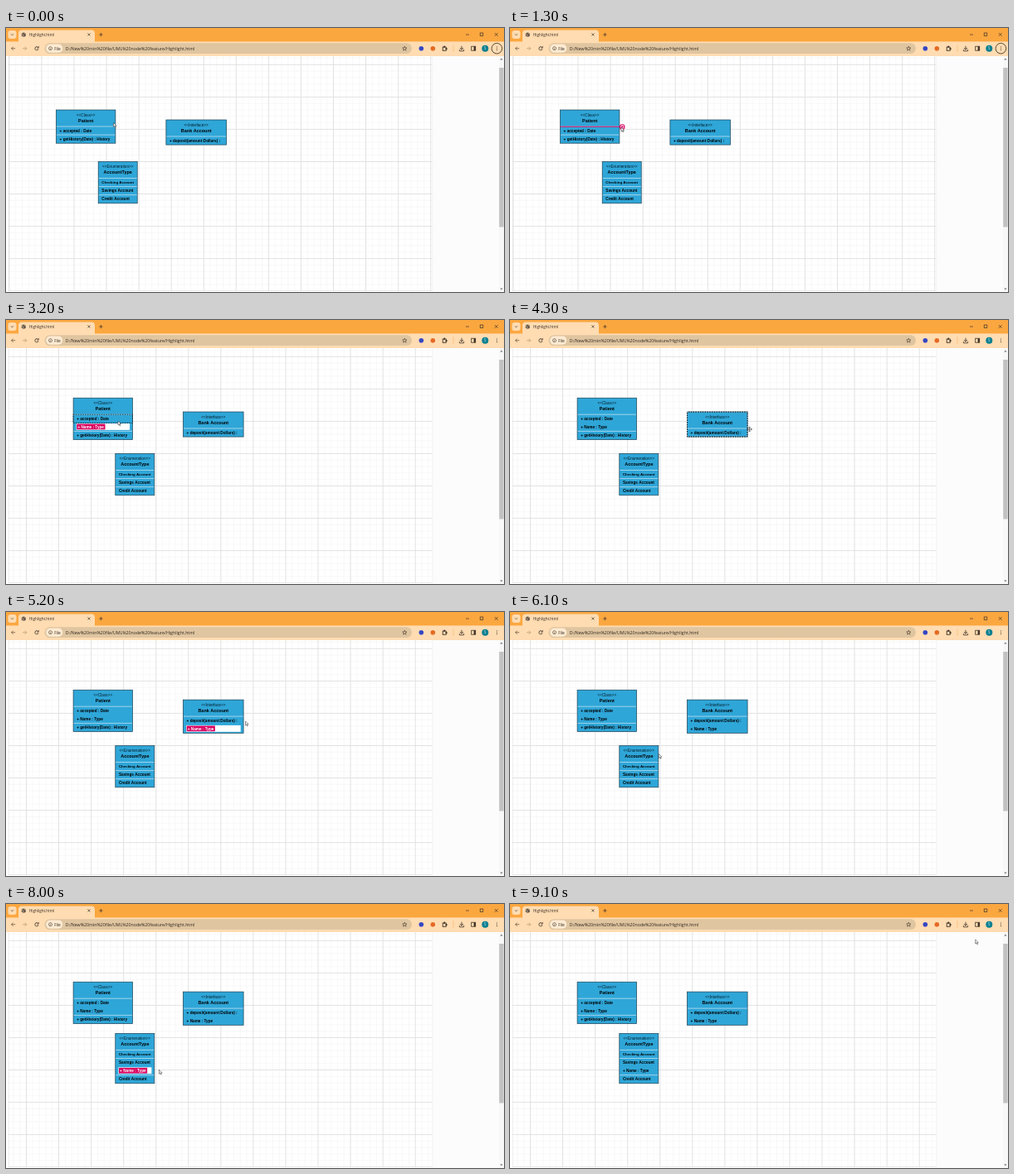
An HTML page with a canvas that plays this animation: 600 px wide and 319 px high, repeating every 9200 ms.

```html
<!DOCTYPE html>
<html lang="en">
<head>
<meta charset="utf-8">
<title>UML row insertion</title>
<style>
html, body { margin: 0; width: 100%; height: 100%; overflow: hidden; background: #fff; }
canvas { display: block; width: 600px; height: 319px; }
</style>
</head>
<body>
<canvas id="stage"></canvas>
<script>
const W = 600, H = 319, LOOP = 9200;
const UI = '"Open Sans", sans-serif', ARIAL = '"Liberation Sans", Arial, sans-serif';
const BLUE = '#2fa6d8', PINK = '#d8005f', INK = '#3d3226';
const STRIP = '#fba740', BAR = '#ffdcb2', FIELD = '#dfc5a0', CHIP = '#fdead2';
const canvas = document.getElementById('stage');
const ctx = canvas.getContext('2d');
const dpr = window.devicePixelRatio || 1;
canvas.width = W * dpr;
canvas.height = H * dpr;

// time, x, y of the pointer tip
const path = [
  [0, 129.5, 114.5], [400, 129.5, 114.5], [500, 131, 117], [1000, 131, 117],
  [1100, 133, 119], [1200, 133, 119], [1300, 134, 120], [1400, 134, 120],
  [1700, 136, 121], [2000, 136, 121], [2300, 135, 122], [3600, 135, 122],
  [4000, 270, 128], [4200, 270, 128], [4300, 288.5, 132], [5800, 288.5, 132],
  [5900, 260, 145], [6100, 179.3, 171.5], [6300, 179.3, 171.5], [6600, 181, 180],
  [6700, 181, 180], [7100, 184, 192], [7200, 184, 192], [7800, 184.5, 200.3],
  [8600, 184.5, 200.3], [8700, 300, 150], [8900, 300, 150], [9000, 500, 70], [9100, 560.7, 43]
];

function pointerAt(t) {
  const i = path.findIndex(k => k[0] >= t);
  if (i < 0) return path[path.length - 1].slice(1);
  if (i === 0) return path[0].slice(1);
  const a = path[i - 1], b = path[i], p = (t - a[0]) / (b[0] - a[0]);
  return [a[1] + (b[1] - a[1]) * p, a[2] + (b[2] - a[2]) * p];
}

function rect(x, y, w, h, fill) {
  ctx.fillStyle = fill;
  ctx.fillRect(x, y, w, h);
}

function pill(x, y, w, h, r, fill) {
  ctx.beginPath();
  ctx.roundRect(x, y, w, h, r);
  ctx.fillStyle = fill;
  ctx.fill();
}

function dot(x, y, r, fill) {
  ctx.beginPath();
  ctx.arc(x, y, r, 0, 7);
  ctx.fillStyle = fill;
  ctx.fill();
}

function ring(x, y, r, color, width) {
  ctx.beginPath();
  ctx.arc(x, y, r, 0, 7);
  ctx.strokeStyle = color;
  ctx.lineWidth = width;
  ctx.stroke();
}

function line(points, color = INK, width = 0.7) {
  ctx.beginPath();
  for (let i = 0; i < points.length; i += 2) ctx.lineTo(points[i], points[i + 1]);
  ctx.strokeStyle = color;
  ctx.lineWidth = width;
  ctx.stroke();
}

function frame(x, y, w, h, color = INK, width = 0.7) {
  ctx.strokeStyle = color;
  ctx.lineWidth = width;
  ctx.strokeRect(x, y, w, h);
}

function text(str, x, y, font, color, align = 'left') {
  ctx.font = font;
  ctx.fillStyle = color;
  ctx.textAlign = align;
  ctx.textBaseline = 'alphabetic';
  ctx.fillText(str, x, y);
}

function drawTabs() {
  rect(0, 0, W, 18, STRIP);
  pill(2.5, 3, 10, 10, 3, BAR);
  line([6, 7.3, 7.5, 8.8, 9, 7.3]);
  pill(15, 2.5, 92, 17, 4, BAR);
  dot(21.3, 8, 2.6, '#5c5146');
  line([19.2, 7.2, 21, 8.2, 20.6, 10], BAR, 0.6);
  line([21.8, 6, 23, 7.6], BAR, 0.6);
  text('Highlight.html', 28, 9.7, `4.57px ${UI}`, '#332a20');
  line([98.4, 6.4, 101.4, 9.4]);
  line([101.4, 6.4, 98.4, 9.4]);
  line([112.2, 8, 116.6, 8]);
  line([114.4, 5.8, 114.4, 10.2]);
  line([554, 8, 558, 8]);
  frame(571.2, 6, 3.6, 3.6);
  line([588.8, 6, 592.6, 9.8]);
  line([592.6, 6, 588.8, 9.8]);
}

function drawToolbar(menuFocus) {
  rect(0, 16.4, W, 17.6, BAR);
  line([11.2, 24.7, 6.6, 24.7], '#5b4933');
  line([8.7, 22.6, 6.6, 24.7, 8.7, 26.8], '#5b4933');
  line([20.2, 24.7, 24.8, 24.7], '#b39870');
  line([22.7, 22.6, 24.8, 24.7, 22.7, 26.8], '#b39870');
  ctx.beginPath();
  ctx.arc(37, 24.7, 2.1, 0.2, 5.5);
  ctx.strokeStyle = INK;
  ctx.lineWidth = 0.8;
  ctx.stroke();
  line([39.2, 22, 39.2, 24, 37.2, 24], INK, 0.8);

  pill(46.5, 18.3, 442.5, 12.8, 6.4, FIELD);
  pill(48.3, 19.6, 20, 10.2, 5, CHIP);
  ring(53.5, 24.7, 2, INK, 0.6);
  line([53.5, 24.5, 53.5, 25.8], INK, 0.6);
  text('File', 58.2, 26.5, `4.8px ${UI}`, '#332a20');
  text('D:/New%20min%20file/UML%20node%20feature/Highlight.html', 71.7, 26.6, `5.24px ${UI}`, '#332a20');

  const star = [];
  for (let i = 0; i <= 10; i++) {
    const r = i % 2 ? 1.2 : 2.8, a = i * Math.PI / 5 - Math.PI / 2;
    star.push(480.3 + r * Math.cos(a), 24.9 + r * Math.sin(a));
  }
  line(star, INK, 0.6);

  dot(500.3, 24.8, 2.8, '#3547c5');
  dot(514.3, 24.8, 2.8, '#e46a24');
  frame(526.2, 23.1, 4, 4.2, INK, 0.9);
  dot(528.2, 22.6, 1.1, INK);
  dot(530.6, 25.2, 1.1, INK);
  line([539, 20.5, 539, 29], '#f8b968', 0.6);
  line([549, 21.8, 549, 26], INK, 0.9);
  line([547, 24.2, 549, 26.2, 551, 24.2], INK, 0.9);
  line([546.4, 26, 546.4, 27.8, 551.6, 27.8, 551.6, 26], INK, 0.8);
  frame(560.7, 22.2, 5, 5, INK, 0.8);
  rect(563.6, 22.2, 2.2, 5, INK);
  dot(577.3, 24.7, 4, '#087f91');
  text('S', 577.3, 26.3, `4.4px ${UI}`, '#e3f5f5', 'center');
  if (menuFocus) ring(591.4, 24.7, 6.3, '#46392a', 0.9);
  for (let i = -1; i < 2; i++) dot(591.4, 24.7 + i * 1.9, 0.55, INK);
}

function drawPage(shift) {
  rect(0, 34, W, H - 34, '#fff');
  rect(513.5, 34, 80.5, H - 34, '#fcfcfc');
  ctx.save();
  ctx.beginPath();
  ctx.rect(3, 34, 510.5, 284);
  ctx.clip();
  const major = 39.06, minor = major / 5, x0 = 3.9 + shift - major, y0 = 44.3 - major;
  for (const isMajor of [false, true]) {
    const color = isMajor ? '#dfdfdf' : '#f3f3f3', width = isMajor ? 0.9 : 0.6;
    for (let i = 0; i < 75; i++) {
      if ((i % 5 === 0) !== isMajor) continue;
      const x = x0 + i * minor, y = y0 + i * minor;
      line([x, 34, x, 318], color, width);
      line([3, y, 514, y], color, width);
    }
  }
  ctx.restore();
  line([3.2, 34, 3.2, 318], '#dedede', 0.6);
  line([513.6, 34, 513.6, 318], '#ececec', 0.5);
  rect(594, 34, 6, H - 34, '#f8f8f8');
  rect(594.2, 48, 5.4, 192.5, '#c2c2c2');
  for (const [y, d] of [[37.5, -1], [315.5, 1]]) {
    ctx.beginPath();
    ctx.moveTo(595.2, y - d);
    ctx.lineTo(598.6, y - d);
    ctx.lineTo(596.9, y + d);
    ctx.fillStyle = '#777';
    ctx.fill();
  }
}

// rows: [label, separator above?, font size]
function drawNode(x, y, w, kind, title, rows, opt = {}) {
  const h = 20 + rows.length * 10.1, cx = x + w / 2;
  rect(x, y, w, h, BLUE);
  text(`<<${kind}>>`, cx, y + 7.6, `4.69px ${ARIAL}`, '#071e29', 'center');
  text(title, cx, y + 14.6, `bold 5.47px ${ARIAL}`, '#000', 'center');
  rows.forEach(([label, sep, size = 4.69], i) => {
    const top = y + 20 + i * 10.1;
    if (sep) line([x, top, x + w, top], '#cfe9f5', 0.7);
    const font = `bold ${size}px ${ARIAL}`;
    if (opt.edit === i) {
      rect(x + 3.6, top + 0.7, w - 7, 7.9, '#fff');
      ctx.font = font;
      rect(x + 4.2, top + 1.3, ctx.measureText(label).width + 2.6, 6.7, PINK);
      text(label, x + 5.3, top + 6.4, font, '#fff');
    } else {
      text(label, x + 4.1, top + 6.6, font, '#000');
    }
  });
  frame(x, y, w, h, '#173e50', 0.7);
  if (opt.dashed) {
    ctx.setLineDash([1.6, 1.2]);
    if (opt.dashed === 'row') frame(x, y + 20, w, 10.1, '#0b2330', 0.9);
    else {
      frame(x, y, w, h, '#c9e6f2', 0.8);
      ctx.lineDashOffset = 1.4;
      frame(x, y, w, h, '#000', 0.8);
      ctx.lineDashOffset = 0;
    }
    ctx.setLineDash([]);
  }
}

function drawInsert(x, w, y) {
  const cx = x + w + 3.3;
  line([x, y, cx - 2.5, y], PINK, 1);
  dot(cx, y + 0.3, 3.2, '#fff');
  ring(cx, y + 0.3, 2.7, PINK, 1.1);
  line([cx - 1.6, y + 0.3, cx + 1.6, y + 0.3], PINK, 0.9);
  line([cx, y - 1.3, cx, y + 1.9], PINK, 0.9);
}

function drawDiagram(t) {
  const within = (a, b) => t >= a && t < b;
  const shift = t >= 3200 ? 20.6 : 0;
  const added = ['+ Name : Type', false];
  drawPage(shift);

  const patient = [['+ accepted : Date', true], ['+ getHistory(Date) : History', true]];
  if (t >= 3200) patient.splice(1, 0, added);
  const editing = within(3200, 3700);
  drawNode(60.5 + shift, t >= 3200 ? 94.2 : 99, 71.4, 'Class', 'Patient', patient,
    { edit: editing ? 1 : -1, dashed: editing ? 'row' : '' });

  const bank = [['+ deposit(amount:Dollars) :', true]];
  if (t >= 5200) bank.push(added);
  drawNode(192.9 + shift, t >= 5200 ? 106.1 : 111, 72.6, 'Interface', 'Bank Account', bank,
    { edit: within(5200, 5900) ? 1 : -1, dashed: within(4300, 4600) ? 'box' : '' });

  const account = [['Checking Account', true, 4.4], ['Savings Account', true], ['Credit Account', true]];
  if (t >= 8000) account.splice(2, 0, added);
  drawNode(111.2 + shift, t >= 8000 ? 156.4 : 161.5, 47, 'Enumeration', 'AccountType', account,
    { edit: within(8000, 8400) ? 2 : -1 });

  if (within(1100, 3200)) drawInsert(60.5, 71.4, 119.2);
  if (within(4600, 5200)) drawInsert(213.5, 72.6, 131.2);
  if (within(6900, 7300)) drawInsert(131.8, 47, 191.5);
  if (within(7300, 8000)) drawInsert(131.8, 47, 201.6);
}

function drawArrow(x, y) {
  ctx.beginPath();
  for (const [dx, dy] of [[0, 0], [0, 5], [1.2, 3.9], [2, 5.8], [2.8, 5.4], [2, 3.6], [3.6, 3.6]]) ctx.lineTo(x + dx, y + dy);
  ctx.closePath();
  ctx.fillStyle = '#fff';
  ctx.fill();
  ctx.strokeStyle = '#222';
  ctx.lineWidth = 0.5;
  ctx.stroke();
}

function drawMove(x, y) {
  for (let i = 0; i < 4; i++) {
    ctx.save();
    ctx.translate(x, y);
    ctx.rotate(i * Math.PI / 2);
    line([0, 0, 0, -2.6], '#222', 0.6);
    line([-1.1, -1.8, 0, -3, 1.1, -1.8], '#222', 0.7);
    ctx.restore();
  }
}

function render(now) {
  const t = Math.floor((now % LOOP) / 100) * 100;
  ctx.setTransform(dpr, 0, 0, dpr, 0, 0);
  drawDiagram(t);
  drawTabs();
  drawToolbar(t < 1500);
  const [x, y] = pointerAt(t);
  (t >= 4300 && t < 4600 ? drawMove : drawArrow)(x, y);
}

const start = performance.now();
function tick() {
  render(performance.now() - start);
  requestAnimationFrame(tick);
}
tick();
</script>
</body>
</html>
```
